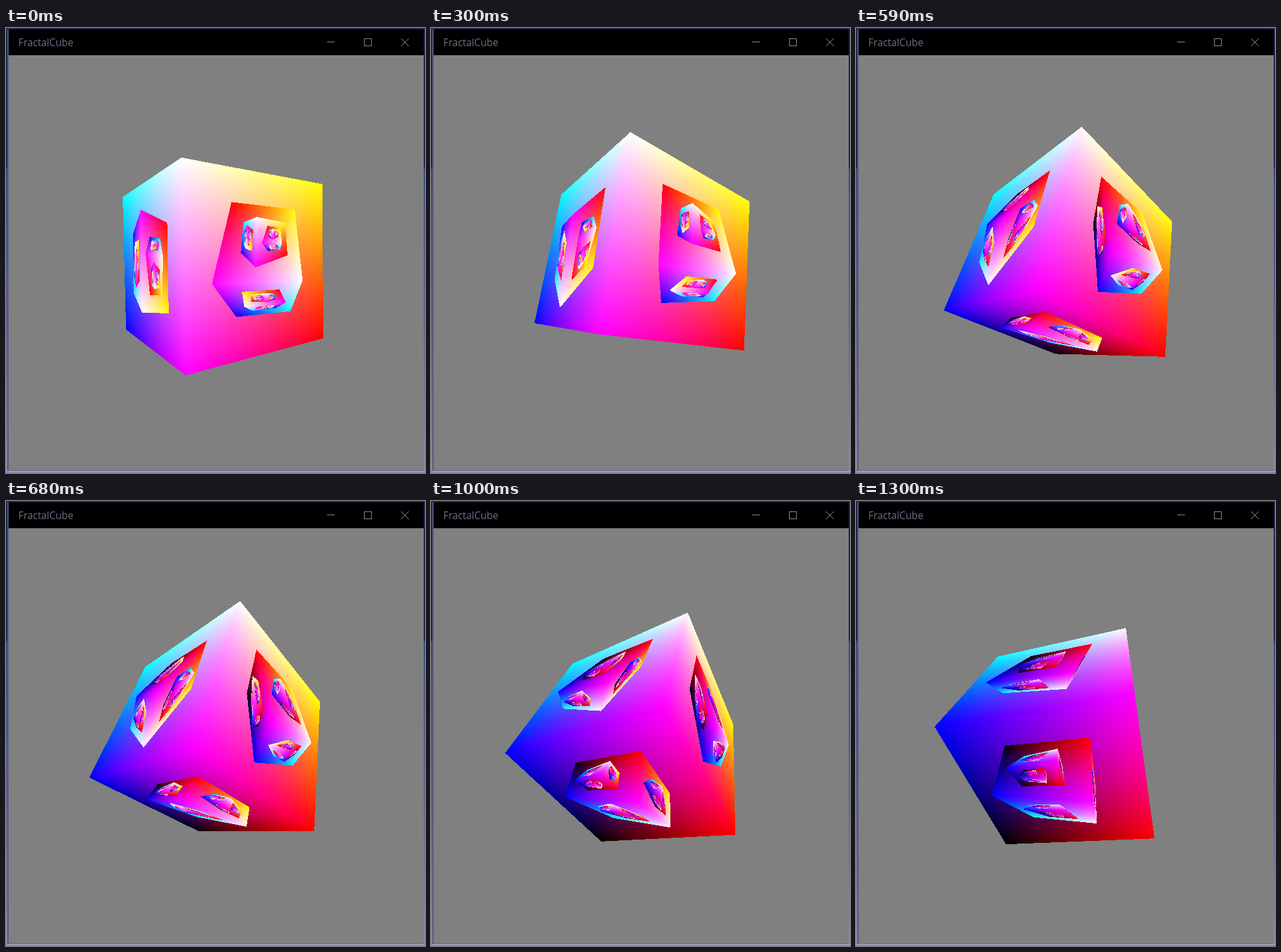
An HTML page with a canvas that plays this animation: 646x686 px, repeating every 1340 ms.

```html
<!DOCTYPE html>
<html lang="en">
<head>
<meta charset="utf-8">
<title>FractalCube</title>
<style>
  html, body { margin: 0; width: 100%; height: 100%; overflow: hidden; background: #808080; }
  svg, canvas { position: absolute; display: block; }
  svg { left: 0; top: 0; }
  canvas { left: 4px; top: 42px; background: #808080; }
  text { font: 15.4px "Open Sans", "Noto Sans", sans-serif; fill: #6f6d85; }
</style>
</head>
<body>
<svg width="646" height="686" viewBox="0 0 646 686" shape-rendering="crispEdges">
  <defs>
    <linearGradient id="side" x1="0" y1="0" x2="0" y2="1">
      <stop offset="0" stop-color="#1c2450"/>
      <stop offset=".31" stop-color="#1c2450"/>
      <stop offset=".32" stop-color="#3c4a80"/>
      <stop offset=".65" stop-color="#5c6090"/>
      <stop offset="1" stop-color="#8a8aa8"/>
    </linearGradient>
  </defs>
  <rect width="646" height="686" fill="url(#side)"/>
  <rect width="646" height="2" fill="#20264e"/>
  <rect x="2" y="2" width="2" height="682" fill="#55597c"/>
  <rect x="4" y="682" width="640" height="1" fill="#66668a"/>
  <rect x="2" y="683" width="644" height="1" fill="#b4b2d0"/>
  <rect x="4" y="2" width="640" height="40" fill="#000"/>
  <text x="19" y="28">FractalCube</text>
  <g fill="none" stroke="#8b8a9b">
    <path d="M495 21.5h12M552.5 16.5h11v11h-11z"/>
    <path d="M609 16l12 12M621 16l-12 12" shape-rendering="auto"/>
  </g>
</svg>
<canvas id="view" width="640" height="640"></canvas>
<script>
const HALF = 320, FOCAL = 440, DIST = 4;
const ZOOM = 1.25;    // size of the picture on each face
const LAG = 0.03;     // every nested picture is a little older
const LEVELS = 6;
const TILT = 1;       // fixed angle; only the axis turns
const GRAY = 128;

// fixed axis, its sign, then the axes that carry picture x and y
const FACES = [[0, 1, 1, 2], [1, -1, 0, 2], [2, 1, 0, 1]];

const STEPS = [30, 40, 50, 40, 50, 40, 50, 50, 50, 40, 50, 50, 50, 40,
  50, 60, 40, 50, 40, 40, 50, 40, 50, 90, 50, 60, 50, 40];
const LOOP = STEPS.reduce((a, b) => a + b);

// axis direction in radians at given times
const KEYS = [[0, -.034], [300, .283], [490, .464], [680, .668],
  [830, .8], [1000, .982], [1300, 1.269]];

const box = { x: 104, y: 104, w: 392, h: 400 };
const ctx = document.getElementById('view').getContext('2d');
const img = ctx.createImageData(box.w, box.h);
const eye = Array.from({ length: LEVELS }, () => [0, 0, 0]);
const rot = Array.from({ length: LEVELS }, () => []);
const rgb = [0, 0, 0], ray = [0, 0, 0], hit = [0, 0, 0];

function phase(t) {
  let i = 1;
  while (i < KEYS.length - 1 && KEYS[i][0] < t) i++;
  const [t0, a] = KEYS[i - 1], [t1, b] = KEYS[i];
  return a + (b - a) * (t - t0) / (t1 - t0);
}

// columns are the cube's red, green and blue axes
function pose(level, phi) {
  const c = Math.cos(TILT), s = Math.sin(TILT), k = 1 - c;
  const x = -Math.sin(phi), y = -Math.cos(phi);
  rot[level] = [
    [c + k * x * x, k * x * y, -s * y],
    [k * x * y, c + k * y * y, s * x],
    [s * y, -s * x, c]
  ];
  eye[level] = rot[level].map(axis => axis[2] * DIST);
}

// finds the cube at picture point (x, y); leaves its colour in rgb
function trace(level, x, y) {
  const o = eye[level], m = rot[level], f = HALF / FOCAL;
  for (let i = 0; i < 3; i++) ray[i] = m[i][0] * x * f + m[i][1] * y * f - m[i][2];
  for (const [a, sign, u, v] of FACES) {
    if (o[a] * sign <= 1) continue;
    const t = (sign - o[a]) / ray[a];
    if (!(t > 0)) continue;
    for (let i = 0; i < 3; i++) hit[i] = o[i] + t * ray[i];
    if (Math.abs(hit[u]) > 1.0001 || Math.abs(hit[v]) > 1.0001) continue;
    const r = hit[0], g = hit[1], b = hit[2];
    if (level + 1 < LEVELS && trace(level + 1, hit[u] / ZOOM, -hit[v] / ZOOM)) return true;
    rgb[0] = (r + 1) * 127.5;
    rgb[1] = (g + 1) * 127.5;
    rgb[2] = (b + 1) * 127.5;
    return true;
  }
  return false;
}

function draw(t) {
  const phi = phase(t), px = img.data;
  for (let l = 0; l < LEVELS; l++) pose(l, phi - l * LAG);
  let p = 0;
  for (let j = 0; j < box.h; j++) {
    const y = 1 - (box.y + j + .5) / HALF;
    for (let i = 0; i < box.w; i++) {
      const on = trace(0, (box.x + i + .5) / HALF - 1, y);
      for (let c = 0; c < 3; c++) px[p++] = on ? rgb[c] : GRAY;
      px[p++] = 255;
    }
  }
  ctx.putImageData(img, box.x, box.y);
}

let shown = -1;
function tick() {
  const t = performance.now() % LOOP;
  let start = 0, i = 0;
  while (t >= start + STEPS[i]) start += STEPS[i++];
  if (i !== shown) draw(start);
  shown = i;
  requestAnimationFrame(tick);
}
tick();
</script>
</body>
</html>
```
